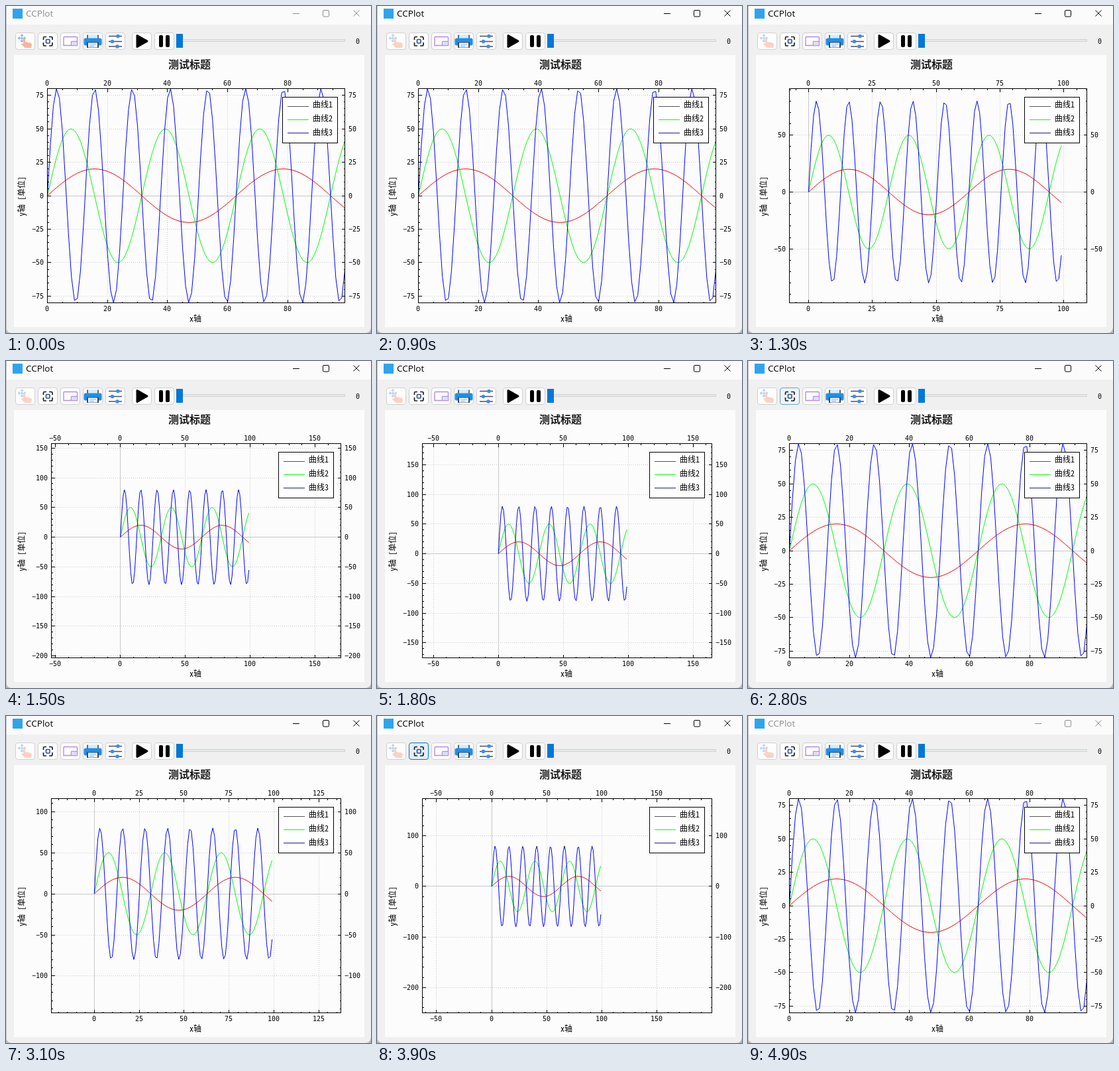
Animation, 551 px wide and 493 px high, one loop 5 s. Source, as an HTML page:

```html
<!DOCTYPE html>
<html lang="zh">
<head>
<meta charset="utf-8">
<title>CCPlot</title>
<style>
html, body { margin: 0; width: 100%; height: 100%; overflow: hidden; background: #f0f0f0; }
svg { display: block; }
text { font: 12px "Noto Sans Mono CJK SC", "Noto Sans CJK SC", "Noto Sans CJK", sans-serif; fill: #000; white-space: pre; }
.num { font: 10px "DejaVu Sans Mono", monospace; }
.mid { text-anchor: middle; }
.end { text-anchor: end; }
.crisp { shape-rendering: crispEdges; }
.btn { fill: #fdfdfd; stroke: #d0d0d0; }
#name { font: 13.5px "Open Sans", "Noto Sans", sans-serif; }
#head { font: bold 16px "Noto Sans CJK SC", "Noto Sans CJK", sans-serif; fill: #1a1a1a; }
</style>
</head>
<body>
<svg width="551" height="493" viewBox="0 0 551 493" fill="none">
  <rect width="551" height="493" fill="#f0f0f0"/>
  <rect width="551" height="28" fill="#fbfbfb"/>
  <path d="M.5 0V493" stroke="#c4c4c4"/>
  <path d="M0 485Q1 492 8 493H0ZM551 485Q550 492 543 493H551Z" fill="#b8b8b8"/>
  <rect x="10" y="4" width="15" height="15" fill="#2fa4ee"/>
  <text id="name" x="30" y="16">CCPlot</text>
  <path id="controls" d="M433 11.5H443M480 6.5H486Q487.500 6.500 487.500 8V14.500Q487.500 16 486 16H480Q478.500 16 478.500 14.500V8Q478.500 6.500 480 6.500M524.500 6.500L533.500 15.500M533.500 6.500L524.500 15.500"/>
  <g id="buttons"></g>

  <g id="hand">
    <path d="M24 43V54M18.500 48.500H29.500M22 45L24 43L26 45M22 52L24 54L26 52M20.500 46.500L18.500 48.500L20.500 50.500M27.500 46.500L29.500 48.500L27.500 50.500" stroke="#6fa8e8" stroke-width="1.300"/>
    <path d="M25.500 49Q27.500 47 29 49V54L36.500 55.500Q39 56 39 58.500L38 63H28.500L23 57.500Q24 55.500 26 57Z" fill="#f8a88c"/>
  </g>
  <path d="M56.500 51V48Q56.500 46.500 58 46.500H61M65 46.500H68Q70 46.500 70 48V51M70 55V58Q70 60 68 60H65M61 60H58Q56.500 60 56.500 58V55" stroke="#222" stroke-width="1.700"/>
  <rect x="60.500" y="50.500" width="5.500" height="5.500" rx="1" stroke="#2b4f86" stroke-width="1.600"/>
  <path d="M88 46.500H106Q107.500 46.500 107.500 48V59.500H87V48Q87 46.500 88 46.500M98.500 53.500H107M98.500 53.500V59.500" stroke="#b48af0" stroke-width="1.400"/>
  <rect x="100" y="55" width="6" height="3" fill="#cfe2ff"/>
  <path d="M122 43.500H140V50H122Z" fill="#5b6b80"/>
  <path d="M124 43H138V50H124Z" fill="#d6ecff"/>
  <rect x="117.500" y="48.500" width="27" height="11" rx="2.500" fill="#1f8fe8"/>
  <path d="M122 54.500H140V63H122Z" fill="#3c4656"/>
  <path d="M124 55.500H138V62.500H124Z" fill="#eef7ff"/>
  <path d="M126 58H136M126 60.500H133" stroke="#8fb7dd"/>
  <path d="M155 45.500H175M155 53.500H175M155 61H175" stroke="#47515f" stroke-width="1.600"/>
  <g fill="#3f8cf0"><circle cx="169" cy="45.500" r="2.800"/><circle cx="160.500" cy="53.500" r="2.800"/><circle cx="168" cy="61" r="2.800"/></g>
  <path d="M198 44.500L213 53L198 61.500Z" fill="#000" stroke="#000" stroke-width="3" stroke-linejoin="round"/>
  <rect x="231" y="44" width="6" height="18" rx="2" fill="#000"/>
  <rect x="241" y="44" width="6" height="18" rx="2" fill="#000"/>

  <rect class="crisp" x="262.500" y="50.500" width="249" height="3" fill="#e7eaea" stroke="#d2d2d2"/>
  <rect x="257" y="42" width="10" height="21" fill="#0078d7"/>
  <text class="num mid" x="531" y="57">0</text>

  <rect x="12" y="74" width="529" height="410" fill="#fcfcfc"/>
  <text id="head" class="mid" x="277" y="94">测试标题</text>
  <text class="mid" x="286" y="476">x轴</text>
  <text class="mid" transform="translate(28 287) rotate(-90)">y轴 [单位]</text>
  <clipPath id="clip"><rect id="area" y="124" height="324"/></clipPath>
  <g id="plot"></g>
</svg>
<script>
const LOOP = 5000, TOP = 124.5, BOTTOM = 447.5;
const $ = id => document.getElementById(id);

// start time, zoom-out steps, cursor x and y, drag x and y
const VIEWS = [
  [0, 0, 0, 0, 0, 0],
  [1300, 1, 255, 249.3, 0, 0],
  [1400, 3, 255, 249.3, 0, 0],
  [1500, 5, 255, 249.3, 0, 0],
  [1800, 5, 255, 249.3, 10.5, 25],
  [1900, 5, 255, 249.3, 15.7, 37],
  [2700, 0, 0, 0, 0, 0],
  [3000, 1, 235, 239.4, 0, 0],
  [3100, 3, 235, 239.4, 0, 0],
  [3200, 6, 235, 239.4, 0, 0],
  [4100, 0, 0, 0, 0, 0]
];
// start time, highlight of the fit button
const HOVER = [[0, 0], [2500, .5], [2600, 1], [2800, .5], [2900, 0],
               [3800, .5], [3900, 1], [4300, .5], [4400, 0]];
const CURVES = [
  { amp: 20, div: 10, color: '#f00', key: '#555' },
  { amp: 50, div: 5, color: '#0f0', key: '#0f0' },
  { amp: 80, div: 2, color: '#00f', key: '#1c1c86' }
];

const at = (list, t) => list.filter(row => row[0] <= t).pop();
const path = (d, stroke, extra = '') => `<path d="${d}" stroke="${stroke}" ${extra}/>`;
const label = (x, y, s, cls) => `<text class="num ${cls}" x="${x}" y="${y}">${s}</text>`;
const snap = v => Math.floor(v) + .5;

// Round tick step closest to a fifth of the range, with its subdivision
function tickStep(range) {
  const raw = range / 5, mag = 10 ** Math.floor(Math.log10(raw));
  const m = [1, 2, 2.5, 5, 10].reduce((a, b) =>
    Math.abs(b - raw / mag) < Math.abs(a - raw / mag) ? b : a);
  return { step: m * mag, parts: m === 2 ? 4 : 5 };
}

function ticks(lo, hi) {
  const { step, parts } = tickStep(hi - lo), sub = step / parts, list = [];
  for (let i = Math.ceil(lo / sub - 1e-6); i * sub <= hi + 1e-6; i++)
    list.push({ v: i * sub, major: i % parts === 0, text: String(i * sub).replace('-', '−') });
  return list;
}

function drawPlot([, zoom, cx, cy, dx, dy]) {
  const k = .85 ** zoom, sy = (BOTTOM - TOP) / 160 * k;
  const oy = cy + (286 - cy) * k + dy;
  const yTicks = ticks((oy - BOTTOM) / sy, (oy - TOP) / sy);
  // Three-digit labels narrow the axes
  const wide = !yTicks.some(t => t.major && Math.abs(t.v) >= 100);
  const left = wide ? 62.5 : 68.5, right = wide ? 511.5 : 505.5, width = right - left;
  const sx = width / 99 * k;
  const ox = left + (cx + (62.5 - cx) * k - 62.5) * width / 449 + dx;
  const xTicks = ticks((left - ox) / sx, (right - ox) / sx);

  let grid = '', zero = '', marks = '', text = '';
  for (const { v, major, text: s } of xTicks) {
    const x = snap(ox + v * sx), n = major ? 5 : 2;
    marks += `M${x} ${TOP}v${n}M${x} ${BOTTOM}v${-n}`;
    if (!major) continue;
    const line = `M${x} ${TOP}V${BOTTOM}`;
    v ? grid += line : zero += line;
    text += label(x - .5, 120, s, 'mid') + label(x - .5, 460, s, 'mid');
  }
  for (const { v, major, text: s } of yTicks) {
    const y = snap(oy - v * sy), n = major ? 5 : 2;
    marks += `M${left} ${y}h${n}M${right} ${y}h${-n}`;
    if (!major) continue;
    const line = `M${left} ${y}H${right}`;
    v ? grid += line : zero += line;
    text += label(left - 5.5, y + 3.5, s, 'end') + label(right + 5.5, y + 3.5, s, '');
  }

  const waves = CURVES.map(({ amp, div, color }) => {
    const pts = Array.from({ length: 100 }, (_, i) =>
      (ox + i * sx).toFixed(2) + ' ' + (oy - amp * Math.sin(i / div) * sy).toFixed(2));
    return path('M' + pts.join('L'), color);
  }).join('');

  const lx = right - 94;
  const legend = `<rect class="crisp" x="${lx}" y="137.5" width="83" height="69" fill="#fff" stroke="#000"/>` +
    CURVES.map(({ key }, i) =>
      path(`M${lx + 7} ${151.5 + 20 * i}h32`, key, 'class="crisp"') +
      `<text x="${lx + 45.5}" y="${153 + 21 * i}">曲线${i + 1}</text>`).join('');

  $('area').setAttribute('x', left);
  $('area').setAttribute('width', width);
  $('plot').innerHTML =
    path(grid, '#c8c8c8', 'class="crisp" stroke-dasharray="1 2"') +
    path(zero, '#c8c8c8', 'class="crisp"') +
    `<g clip-path="url(#clip)">${waves}</g>` +
    path(`M${left} ${TOP}H${right}V${BOTTOM}H${left}Z` + marks, '#000', 'class="crisp"') +
    text + legend;
}

$('buttons').innerHTML = [14, 48, 82, 116, 150, 190, 224].map(x => {
  const box = `x="${x + .5}" y="40.5" width="29" height="25" rx="3.5"`;
  const glow = x === 48 ? `<rect id="glow" ${box} fill="#e0eef9" stroke="#0078d4"/>` : '';
  return `<rect class="btn" ${box}/>` + glow;
}).join('');

let shown;
function frame() {
  const t = performance.now() % LOOP, view = at(VIEWS, t);
  if (view !== shown) drawPlot(shown = view);
  $('glow').setAttribute('opacity', at(HOVER, t)[1]);
  $('hand').setAttribute('opacity', t < 800 ? .85 : .5);
  const ink = t >= 700 && t < 4900 ? '#000' : '#8c8c8c';
  $('name').style.fill = ink;
  $('controls').setAttribute('stroke', ink);
  requestAnimationFrame(frame);
}
frame();
</script>
</body>
</html>
```
